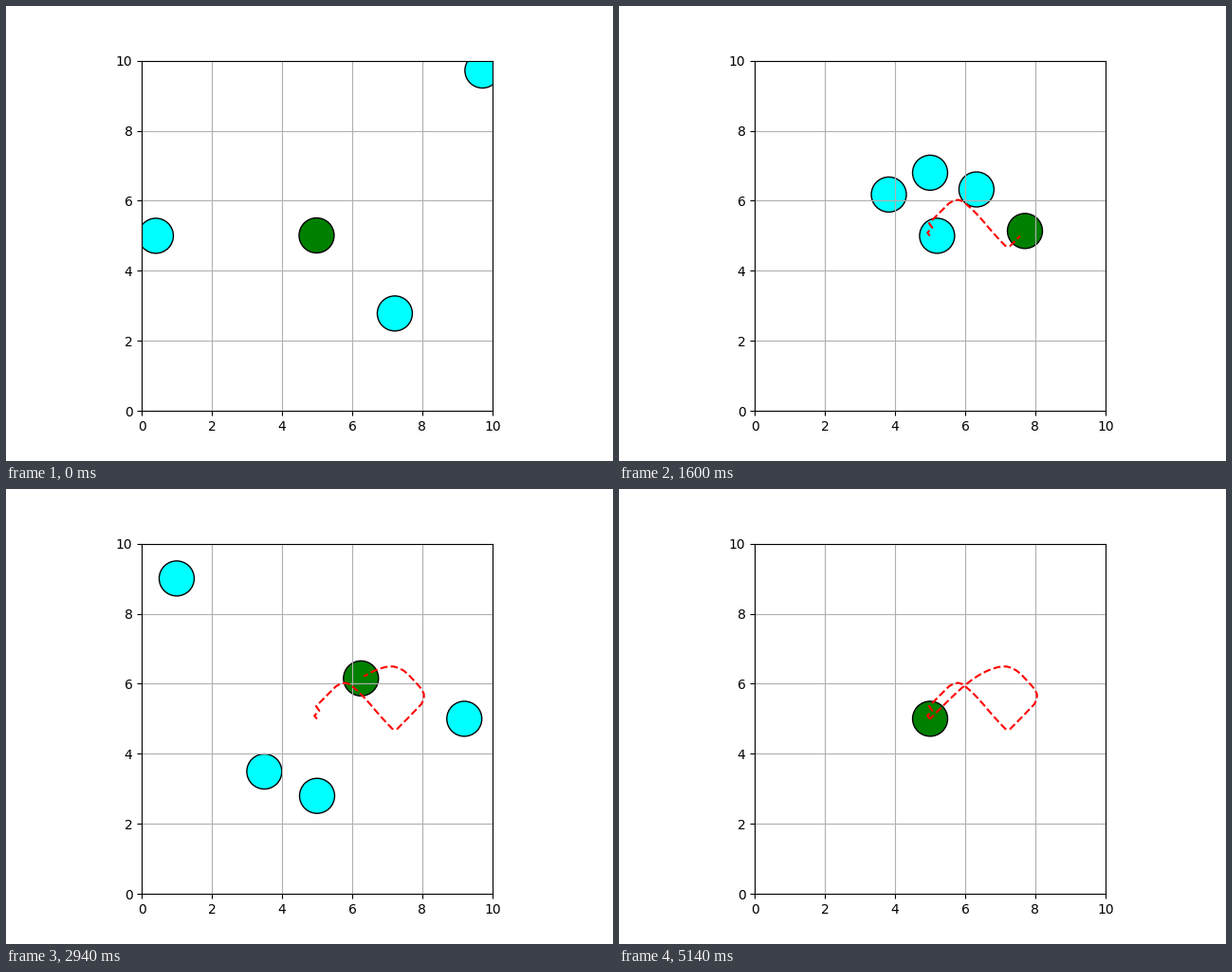
Recreate the animation shown at these times as a matplotlib script. Size 640 by 480 pixels, loop 5260 ms.

```python
import numpy as np
import matplotlib.pyplot as plt
from matplotlib.animation import FuncAnimation
from matplotlib.patches import Circle

STEPS = 80
DT = 0.1
RADIUS = 0.5
SPEED = 2.0
AXIS_STEP = SPEED * DT / np.sqrt(2)  # farthest move per axis in one step
LOOP_MS = 5260
GOAL = np.array([5.0, 5.0])

# Start point and heading of each moving obstacle
OBSTACLES = [
    ((5, 12), -np.pi / 2),
    ((0, 5), 0),
    ((10, 10), -3 * np.pi / 4),
    ((7.5, 2.5), 3 * np.pi / 4),
]

# Velocity keys while evading: step, vx, vy as shares of the axis limit
TURNS = np.array([
    (1, -0.10, 0.07), (2, -0.45, 0.55), (3, 1, 1), (4, -0.66, 0.91),
    (5, 1, 1), (8, 1, 1), (12, 0.85, -0.70), (17, 0.83, -1),
    (21, 0.94, -0.97), (23, 1, 1), (27, 0.95, 1), (31, -0.90, 1),
    (33, -0.93, 1), (38, -1, -0.20),
])


def obstacle_path(start, heading):
    dist = SPEED * DT * np.arange(1, STEPS + 1)[:, None]
    return np.array(start) + dist * np.array([np.cos(heading), np.sin(heading)])


def home_step(pos):
    """Ease towards the goal and rest once within 0.1 of it."""
    gap = GOAL - pos
    norm = np.hypot(*gap)
    if norm < 0.1:
        return np.zeros(2)
    pull = 2 * SPEED * DT * gap / norm
    return np.sign(pull) * np.maximum(np.abs(pull) - 1.5 * AXIS_STEP, 0)


def robot_path():
    key, vx, vy = TURNS.T
    path = [GOAL]
    for n in range(1, STEPS):
        if n <= key[-1]:
            step = AXIS_STEP * np.array([np.interp(n, key, vx), np.interp(n, key, vy)])
        else:
            step = home_step(path[-1])
        path.append(path[-1] + step)
    return np.array(path)


robot = robot_path()
tracks = [obstacle_path(*ob) for ob in OBSTACLES]

fig = plt.figure(figsize=(6.4, 4.8), dpi=100)
ax = fig.add_subplot(111, autoscale_on=False, xlim=(0, 10), ylim=(0, 10))
ax.set_aspect("equal")
ax.grid()


def disc(center, color):
    return ax.add_patch(Circle(center, RADIUS, facecolor=color, edgecolor="black"))


trail, = ax.plot([], [], "--r")
body = disc(robot[0], "green")
balls = [disc(track[0], "aqua") for track in tracks]


def update(frame):
    i = frame + 1
    body.center = robot[i]
    for ball, track in zip(balls, tracks):
        ball.center = track[i]
    trail.set_data(robot[:i, 0], robot[:i, 1])
    return [body, trail, *balls]


def init():
    return update(0)


anim = FuncAnimation(fig, update, frames=STEPS - 1, init_func=init,
                     interval=LOOP_MS / (STEPS - 1), repeat=True, repeat_delay=0)
plt.show()
```
